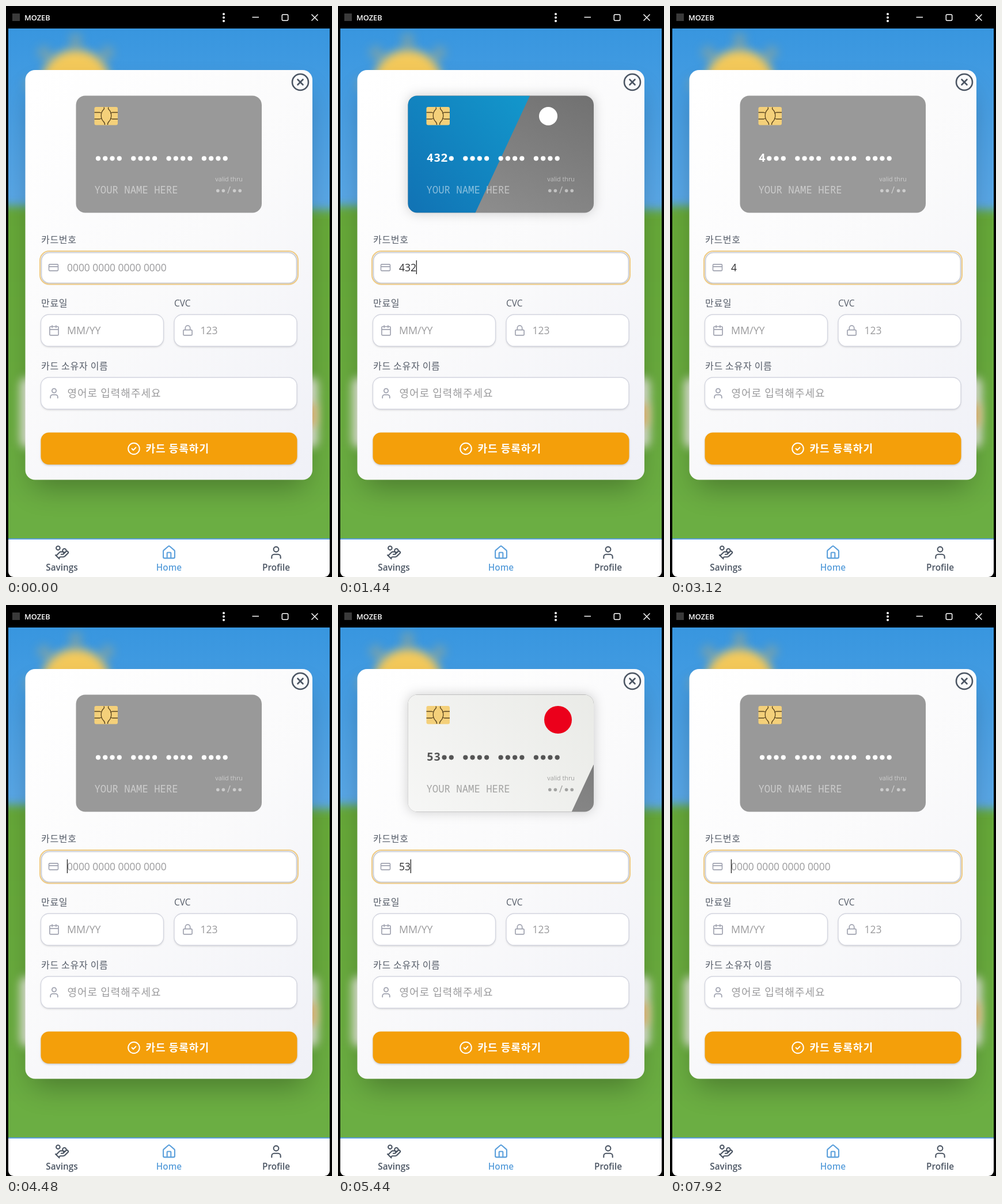
Write an HTML page with a canvas that moves like this. It is 566x990 px and loops after 8000 ms.

```html
<!DOCTYPE html>
<html lang="ko">
<head>
<meta charset="utf-8">
<title>Card form</title>
<style>
  html, body { margin: 0; width: 100%; height: 100%; overflow: hidden; background: #000; }
  canvas { display: block; width: 566px; height: 990px; }
</style>
</head>
<body>
<canvas id="stage" width="566" height="990"></canvas>
<script>
const W = 566, H = 990, LOOP = 8000;
const stage = document.getElementById('stage').getContext('2d');
const backdrop = document.createElement('canvas');
backdrop.width = W;
backdrop.height = H;

const SANS = '"Open Sans", "Noto Sans", sans-serif';
const MONO = '"Noto Sans Mono", "DejaVu Sans Mono", monospace';
const KOREAN = '"Noto Sans CJK KR", "Noto Sans CJK", sans-serif';
const FIELD_FONT = `17.4px ${SANS}`;
const HINT = '#9a9a9c', LABEL = '#555c68', SLATE = '#4b5563', BLUE = '#5a9fdb';
const CARD = { x: 121.5, y: 155.5, w: 322.5, h: 203, r: 16 };

const ICONS = {
  card: 'M4 5h16a2 2 0 0 1 2 2v10a2 2 0 0 1-2 2H4a2 2 0 0 1-2-2V7a2 2 0 0 1 2-2zM2 10h20',
  calendar: 'M8 2v4M16 2v4M5 4h14a2 2 0 0 1 2 2v14a2 2 0 0 1-2 2H5a2 2 0 0 1-2-2V6a2 2 0 0 1 2-2zM3 10h18',
  lock: 'M5 11h14a2 2 0 0 1 2 2v7a2 2 0 0 1-2 2H5a2 2 0 0 1-2-2v-7a2 2 0 0 1 2-2zM7 11V7a5 5 0 0 1 10 0v4',
  user: 'M19 21v-2a4 4 0 0 0-4-4H9a4 4 0 0 0-4 4v2M16 7a4 4 0 1 1-8 0a4 4 0 1 1 8 0',
  check: 'M22 12a10 10 0 1 1-20 0a10 10 0 1 1 20 0M8.5 12l2.5 2.5 4.5-4.5',
  home: 'M15 21v-8a1 1 0 0 0-1-1h-4a1 1 0 0 0-1 1v8M3 10a2 2 0 0 1 .7-1.5l7-6a2 2 0 0 1 2.6 0l7 6A2 2 0 0 1 21 10v9a2 2 0 0 1-2 2H5a2 2 0 0 1-2-2z',
  savings: 'M11 15h2a2 2 0 1 0 0-4h-3c-.6 0-1.1.2-1.4.6L3 17M7 21l1.6-1.4c.3-.4.8-.6 1.4-.6h4c1.1 0 2.1-.4 2.8-1.2l4.6-4.4a2 2 0 0 0-2.75-2.91l-4.2 3.9M2 16l6 6M18.9 9a2.9 2.9 0 1 1-5.8 0a2.9 2.9 0 1 1 5.8 0M9 5a3 3 0 1 1-6 0a3 3 0 1 1 6 0'
};

// What the number field holds from each moment on.
const TYPING = [
  [0, ''], [560, '4'], [880, '43'], [1280, '432'], [2880, '43'], [3120, '4'], [3360, ''],
  [4800, '5'], [5040, '53'], [5840, '536'], [6640, '53'], [7120, '5'], [7360, '']
];
const CARET_FLIPS = [400, 1840, 2360, 2880, 3520, 4000, 4480, 5520, 5840, 6320, 6880, 7360, 7920];
const SKINS = [
  { from: 1280, to: 2880, sweep: 1272, colors: ['#0f509e', '#1399cd'], ink: '#fff',
    badge: { x: 365, y: 191, r: 16, color: '#fff' } },
  { from: 5040, to: 7120, sweep: 5145, colors: ['#fbfbfb', '#e8e9e5'], ink: '#555',
    badge: { x: 382, y: 199, r: 24, color: '#eb001b' } }
];

function roundRect(c, x, y, w, h, r) {
  c.beginPath();
  c.roundRect(x, y, w, h, r);
}

function disc(c, x, y, r, color) {
  c.fillStyle = color;
  c.beginPath();
  c.arc(x, y, r, 0, Math.PI * 2);
  c.fill();
}

function line(c, ...points) {
  c.beginPath();
  for (let i = 0; i < points.length; i += 2) c.lineTo(points[i], points[i + 1]);
  c.stroke();
}

function text(c, str, x, y, font, color, { align = 'left', spacing = 0 } = {}) {
  c.font = font;
  c.fillStyle = color;
  c.textAlign = align;
  c.letterSpacing = spacing + 'px';
  c.fillText(str, x, y);
}

function gradient(c, x0, y0, x1, y1, colors) {
  const g = c.createLinearGradient(x0, y0, x1, y1);
  colors.forEach((color, i) => g.addColorStop(i / (colors.length - 1), color));
  return g;
}

function shadow(c, color, blur, dy) {
  c.shadowColor = color;
  c.shadowBlur = blur;
  c.shadowOffsetY = dy;
}

function icon(c, name, x, y, scale, color, weight = 2) {
  c.save();
  c.translate(x, y);
  c.scale(scale, scale);
  c.translate(-12, -12);
  c.lineWidth = weight;
  c.lineCap = c.lineJoin = 'round';
  c.strokeStyle = color;
  c.stroke(new Path2D(ICONS[name]));
  c.restore();
}

function drawScenery(c) {
  c.save();
  c.beginPath();
  c.rect(4, 39, 558, 886);
  c.clip();
  c.fillStyle = gradient(c, 0, 39, 0, 350, ['#3896df', '#5ba8e7']);
  c.fillRect(4, 39, 558, 330);

  c.filter = 'blur(8px)';
  c.fillStyle = 'rgba(190, 175, 110, .38)';
  for (let i = 0; i < 8; i++) {
    c.save();
    c.translate(121, 136);
    c.rotate(i * Math.PI / 4 + Math.PI / 4);
    c.fillRect(60, -10, 28, 20);
    c.restore();
  }
  disc(c, 121, 136, 60, '#f4c95a');

  c.fillStyle = gradient(c, 0, 350, 0, 925, ['#66a838', '#6bae43']);
  c.beginPath();
  c.moveTo(-40, 346);
  c.lineTo(606, 354);
  c.lineTo(606, 980);
  c.lineTo(-40, 980);
  c.fill();

  c.fillStyle = 'rgba(246, 243, 238, .9)';
  roundRect(c, 25, 644, 516, 122, 12);
  c.fill();
  c.fillStyle = '#e9b768';
  c.fillRect(500, 690, 38, 38);
  c.restore();
}

function drawTitleBar(c) {
  c.fillStyle = '#3a3a3a';
  c.fillRect(11, 13, 13, 13);
  text(c, 'MOZEB', 32, 24.5, `600 12.8px ${SANS}`, '#fff');
  for (const y of [14, 20, 26]) disc(c, 378, y, 2, '#fff');
  c.strokeStyle = '#fff';
  c.lineWidth = 1.5;
  line(c, 427.5, 19.5, 439, 19.5);
  roundRect(c, 479.3, 14.8, 10.4, 10.4, 2);
  c.stroke();
  line(c, 530.5, 14.5, 541.5, 25.5);
  line(c, 541.5, 14.5, 530.5, 25.5);
}

function drawNav(c) {
  c.fillStyle = '#fff';
  roundRect(c, 4, 924, 558, 66, [0, 0, 9, 9]);
  c.fill();
  c.fillStyle = BLUE;
  c.fillRect(4, 923, 558, 2);
  const tabs = [['savings', 'Savings', 97, SLATE], ['home', 'Home', 283, BLUE], ['user', 'Profile', 469, SLATE]];
  for (const [name, label, x, color] of tabs) {
    icon(c, name, x, 947.5, 1.1, color, 1.9);
    text(c, label, x, 979, `600 15.3px ${SANS}`, color, { align: 'center' });
  }
}

function drawField(c, x, y, w, h) {
  c.save();
  shadow(c, 'rgba(0, 0, 0, .16)', 3, 1.5);
  c.fillStyle = '#fff';
  roundRect(c, x, y, w, h, 14);
  c.fill();
  c.restore();
  c.strokeStyle = '#d3d5df';
  c.lineWidth = 1.3;
  c.stroke();
}

function drawPanel(c) {
  c.save();
  shadow(c, 'rgba(0, 0, 0, .3)', 50, 25);
  c.fillStyle = '#fff';
  roundRect(c, 45, 123, 475, 686, 16);
  c.fill();
  c.restore();
  c.fillStyle = gradient(c, 0, 170, 566, 760, ['#ffffff', '#fafafb', '#f0f1f7']);
  roundRect(c, 33.5, 111, 498.5, 710.5, 17);
  c.fill();

  c.strokeStyle = SLATE;
  c.lineWidth = 2.6;
  c.lineCap = 'round';
  c.beginPath();
  c.arc(511, 132, 14, 0, Math.PI * 2);
  c.stroke();
  line(c, 506.5, 127.5, 515.5, 136.5);
  line(c, 515.5, 127.5, 506.5, 136.5);
  c.lineCap = 'butt';

  const korean = { spacing: 0.7 };
  const labelFont = `16px ${KOREAN}`;
  text(c, '카드번호', 61, 411, labelFont, LABEL, korean);
  text(c, '만료일', 61, 520.5, labelFont, LABEL, korean);
  text(c, '카드 소유자 이름', 61, 629.5, labelFont, LABEL, korean);
  text(c, 'CVC', 292, 521, `15.4px ${SANS}`, LABEL);

  drawField(c, 61.5, 427.5, 443, 53);
  c.strokeStyle = '#c9ccd3';
  c.lineWidth = 1.6;
  c.stroke();
  c.strokeStyle = '#efca82';
  c.lineWidth = 2;
  roundRect(c, 59, 425, 448, 57.5, 16);
  c.stroke();
  drawField(c, 60.5, 535, 213, 55);
  drawField(c, 292, 535, 213, 55);
  drawField(c, 60.5, 644, 444.5, 55);

  const dim = '#a0a3b0';
  icon(c, 'card', 82.5, 453.5, 0.8, dim);
  icon(c, 'calendar', 83.5, 562.5, 0.84, dim);
  icon(c, 'lock', 315.5, 562.5, 0.84, dim);
  icon(c, 'user', 83.5, 671.5, 0.9, dim);
  text(c, 'MM/YY', 106, 569, `17.8px ${SANS}`, HINT);
  text(c, '123', 337.5, 569, FIELD_FONT, HINT);
  text(c, '영어로 입력해주세요', 106.5, 678, `18px ${KOREAN}`, HINT, { spacing: 1 });

  c.save();
  shadow(c, 'rgba(0, 0, 0, .2)', 3, 1.5);
  c.fillStyle = '#f49f0a';
  roundRect(c, 60.5, 739.5, 445, 55.5, 14);
  c.fill();
  c.restore();
  icon(c, 'check', 222, 767.5, 0.98, '#fff');
  text(c, '카드 등록하기', 242.5, 774, `600 18px ${KOREAN}`, '#fff', { spacing: 1 });
}

function drawChip(c) {
  c.fillStyle = '#f4d07a';
  roundRect(c, 153.5, 175, 40.5, 31.5, 3);
  c.fill();
  c.strokeStyle = '#5a451f';
  c.lineWidth = 1.3;
  c.stroke(new Path2D('M170 175.5c1 2 1 3-1 4.5c-5 5-5 15 0 20c2 2 3 3 2.5 6' +
    'M178 175.5c-1 2-1 3 1 4.5c5 5 5 15 0 20c-2 2-3 3-2.5 6' +
    'M153.5 184.5h9l4 1.5M153.5 196h9l4-1.5M194 184.5h-9l-4 1.5M194 196h-9l-4-1.5'));
}

// CSS ease-out: cubic-bezier(0, 0, .58, 1).
function easeOut(x) {
  let lo = 0, hi = 1;
  for (let i = 0; i < 24; i++) {
    const s = (lo + hi) / 2;
    if (3 * s * s * (1 - s) * 0.58 + s ** 3 < x) lo = s; else hi = s;
  }
  return 3 * lo * lo * (1 - lo) + lo ** 3;
}

function drawSweep(c, skin, t) {
  const k = Math.max(0, Math.min(1, (t - skin.sweep) / 500));
  const reach = -80 + 590 * easeOut(k);
  const top = CARD.x + reach;
  const slant = CARD.h * Math.tan(25 * Math.PI / 180);
  const shift = reach - 510;
  c.fillStyle = gradient(c, 90 + shift, 384, 529 + shift, 15, skin.colors);
  c.beginPath();
  c.moveTo(top - 900, CARD.y);
  c.lineTo(top, CARD.y);
  c.lineTo(top - slant, CARD.y + CARD.h);
  c.lineTo(top - 900, CARD.y + CARD.h);
  c.fill();
}

function drawCard(c, t, digits) {
  const skin = SKINS.find(s => t >= s.from && t < s.to);
  const { x, y, w, h, r } = CARD;
  const ink = skin ? skin.ink : '#fff';

  c.save();
  roundRect(c, x, y, w, h, r);
  if (skin) shadow(c, 'rgba(0, 0, 0, .2)', 20, 0);
  c.fillStyle = skin ? gradient(c, 215, 402, 350, 112, ['#939393', '#717171']) : '#999';
  c.fill();
  shadow(c, 'transparent', 0, 0);
  if (skin) {
    c.clip();
    drawSweep(c, skin, t);
  }
  c.restore();

  drawChip(c);
  if (skin) disc(c, skin.badge.x, skin.badge.y, skin.badge.r, skin.badge.color);

  text(c, digits, 153.7, 270.3, `bold 20.4px ${MONO}`, ink);
  for (let i = digits.length; i < 19; i++) {
    if (i % 5 < 4) disc(c, 160 + i * 12.26, 264.3, 4.1, ink);
  }

  c.globalAlpha = 0.5;
  text(c, 'YOUR NAME HERE', 153.5, 325, `17.3px ${MONO}`, ink);
  text(c, 'valid thru', 411, 303.5, `10.8px ${SANS}`, ink, { align: 'right' });
  for (const dx of [0, 9.6, 28.8, 38.4]) disc(c, 367.8 + dx, 320.3, 2.8, ink);
  text(c, '/', 387, 325, `16px ${MONO}`, ink, { align: 'center' });
  c.globalAlpha = 1;
}

function drawNumber(c, t, digits) {
  const x = 106;
  if (digits) text(c, digits, x, 460, FIELD_FONT, '#2e2e30');
  else text(c, '0000 0000 0000 0000', x, 460, FIELD_FONT, HINT);
  const flips = CARET_FLIPS.filter(f => f <= t).length;
  if (flips % 2) {
    c.font = FIELD_FONT;
    c.fillStyle = '#222';
    c.fillRect(x + c.measureText(digits).width - 0.2, 441, 1.3, 24);
  }
}

function drawBackdrop() {
  const c = backdrop.getContext('2d');
  c.fillStyle = '#000';
  c.fillRect(0, 0, W, H);
  drawScenery(c);
  drawTitleBar(c);
  drawPanel(c);
  drawNav(c);
}

function render(now) {
  const t = (now - start) % LOOP;
  const digits = TYPING.findLast(([at]) => at <= t)[1];
  stage.drawImage(backdrop, 0, 0);
  drawCard(stage, t, digits);
  drawNumber(stage, t, digits);
}

function tick() {
  render(performance.now());
  requestAnimationFrame(tick);
}

drawBackdrop();
const start = performance.now();
tick();
</script>
</body>
</html>
```
